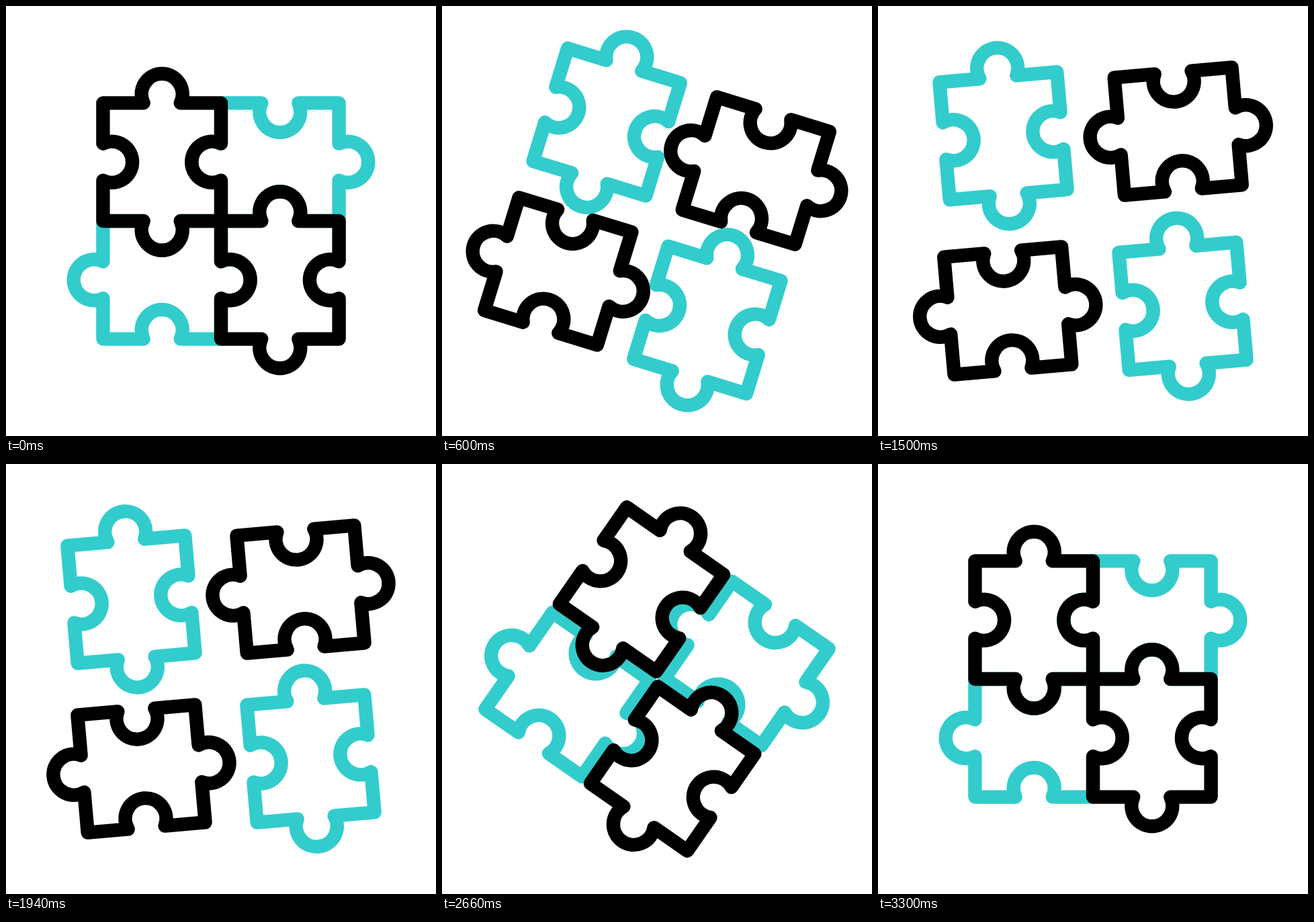
These frames come from a looping animation (640x640 px, 3.62 s). An HTML page with a canvas:

```html
<!DOCTYPE html>
<html lang="en">
<head>
<meta charset="utf-8">
<title>Puzzle</title>
<style>
  html, body { margin: 0; height: 100%; overflow: hidden; background: #fff; }
  canvas { display: block; }
</style>
</head>
<body>
<canvas id="stage" width="640" height="640"></canvas>
<script>
const LOOP = 3620, HALF = 87.8;
const ctx = document.getElementById('stage').getContext('2d');

// One piece around its own centre: tabs above and below, notches left and right.
const piece = new Path2D(`M-${HALF} -${HALF}
  H-27.5 A30.5 30.5 0 1 1 27.5 -${HALF} H${HALF}
  V-27.5 A30.5 30.5 0 1 0 ${HALF} 27.5 V${HALF}
  H27.5 A30.5 30.5 0 1 1 -27.5 ${HALF} H-${HALF}
  V27.5 A30.5 30.5 0 1 0 -${HALF} -27.5 Z`);

// Ease-out Bezier whose handles both sit at y = 1.
function easeOut(x, x1 = 1 / 3, x2 = 2 / 3) {
  if (x <= 0 || x >= 1) return x <= 0 ? 0 : 1;
  let lo = 0, hi = 1;
  for (let i = 0; i < 24; i++) {
    const s = (lo + hi) / 2, r = 1 - s;
    if (3 * r * r * s * x1 + 3 * r * s * s * x2 + s ** 3 < x) lo = s; else hi = s;
  }
  return 1 - (1 - lo) ** 3;
}

const span = (t, from, to) => (t - from) / (to - from);
const rad = deg => deg * Math.PI / 180;

function pose(t) {
  const open = easeOut(span(t, 200, 1240));
  const close = span(t, 2260, 3300);
  return {
    angle: -95 * open - 265 * easeOut(close, 0.113, 0.607),
    spread: open - easeOut(close, 0.24, 0.74),
    push: 15 * (easeOut(span(t, 1400, 1750)) - easeOut(span(t, 1750, 2100)))
  };
}

function draw(now) {
  const { angle, spread, push } = pose(now % LOOP);
  ctx.setTransform(1, 0, 0, 1, 0, 0);
  ctx.fillStyle = '#fff';
  ctx.fillRect(0, 0, 640, 640);
  ctx.lineWidth = 20.4;
  ctx.lineJoin = 'round';
  for (const slot of [1, 3, 0, 2]) {
    ctx.setTransform(1, 0, 0, 1, 320, 320);
    ctx.rotate(rad(90 * slot));
    ctx.translate(-push, 0);
    ctx.rotate(rad(angle));
    ctx.translate(-HALF - 35 * spread, -HALF - 40.5 * spread);
    ctx.strokeStyle = slot % 2 ? '#33cccc' : '#000';
    ctx.stroke(piece);
  }
  requestAnimationFrame(draw);
}
draw(0);
</script>
</body>
</html>
```
